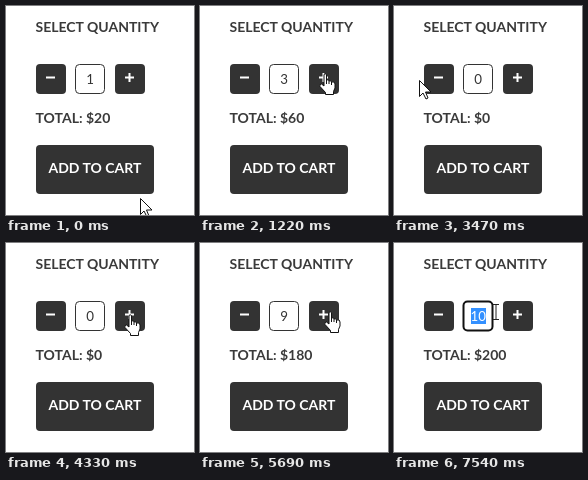
An HTML page that plays this animation: 188 by 209 pixels, repeating every 8000 ms.

```html
<!DOCTYPE html>
<html lang="en">
<head>
<meta charset="utf-8">
<title>Quantity picker</title>
<style>
  html, body { margin: 0; width: 100%; height: 100%; overflow: hidden; background: #fff; }
  svg { display: block; width: 188px; height: 209px; }
  text { font: 700 14px Lato, sans-serif; fill: #3a3a3a; }
  .dark { fill: #333; }
  .light { fill: #fff; }
  #count { font-weight: 400; font-size: 13.33px; text-anchor: middle; fill: #333; }
  #field { fill: #fff; stroke: #333; }
  #field.focus { stroke: #111; stroke-width: 2; }
  #arrow, #hand { fill: #fff; stroke: #111; stroke-linejoin: round; }
  #beam { fill: none; stroke: #222; }
</style>
</head>
<body>
<svg viewBox="0 0 188 209">
  <text x="29.5" y="26">SELECT QUANTITY</text>
  <rect class="dark" x="30" y="58" width="30" height="30" rx="4"/>
  <path class="light" d="M40 70.5h9v2h-9z"/>
  <rect id="field" x="69.5" y="58.5" width="29" height="29" rx="4"/>
  <rect id="mark" x="77" y="65" height="16" fill="#3390ff"/>
  <text id="count" x="84.2" y="78">1</text>
  <rect class="dark" x="109" y="58" width="30" height="30" rx="4"/>
  <path class="light" d="M119 70.5h9v2h-9zM122.5 67h2v9h-2z"/>
  <text id="total" x="29.5" y="117">TOTAL: $20</text>
  <rect class="dark" x="30" y="139" width="118" height="49" rx="4"/>
  <text class="light" x="42.5" y="167">ADD TO CART</text>
  <g id="cursor">
    <path id="arrow" d="M.5.5V16.5L4 13L7 19L9 18L6.5 12H12Z"/>
    <g id="hand" transform="translate(-6)">
      <path d="M5 1.5Q6 0 7.5 1.5V7Q10 6 10 8Q12 7 12.5 9Q16 8 16 11V15L14.5 18.5V21.5H6.5V19.5L1 13.5Q0 11 2.5 11L5 13Z"/>
      <path d="M7.5 7v4M10 8v3M12.5 9v3"/>
    </g>
    <path id="beam" d="M-3 -7.5h6M0 -7.5v15M-3 7.5h6"/>
  </g>
</svg>
<script>
const LOOP = 8000;
const STEP = 77;
const $ = id => document.getElementById(id);

// Pointer waypoints: time, x, y
const path = [
  [0, 134, 192], [280, 132, 142], [690, 125, 67], [1750, 126, 66],
  [2080, 50, 69], [2470, 48, 69], [3140, 51, 70], [3470, 25, 74],
  [3650, 14, 73], [3950, 31, 71], [4180, 112, 70], [4330, 124, 71],
  [4560, 129, 69], [6310, 130, 68], [6690, 104, 75], [6930, 64, 73],
  [7160, 74, 72], [7460, 104, 70], [7540, 102, 69]
];
const plus = [760, 1140, 1520];
const minus = [2310, 2470, 2700, 2920];

function pointer(t) {
  const k = path.findLastIndex(p => t >= p[0]);
  const [t0, x0, y0] = path[k];
  const [t1, x1, y1] = path[k + 1] || [LOOP, x0, y0];
  const u = Math.floor((t - t0) / STEP) * STEP / (t1 - t0);
  return [Math.round(x0 + (x1 - x0) * u), Math.round(y0 + (y1 - y0) * u)];
}

function quantity(t) {
  if (t >= 4400) return Math.min(10, Math.floor((t - 4260) / 150));
  const clicks = list => list.filter(c => t >= c).length;
  return 1 + clicks(plus) - clicks(minus);
}

function shape(x, y, t) {
  const row = y >= 58 && y < 88;
  if (t >= 7160 || row && x >= 69 && x < 99) return 'beam';
  const small = row && (x >= 30 && x < 60 || x >= 109 && x < 139);
  const cart = x >= 30 && x < 148 && y >= 139 && y < 188;
  return small || cart ? 'hand' : 'arrow';
}

function draw(t) {
  const [x, y] = pointer(t);
  const kind = shape(x, y, t);
  $('cursor').setAttribute('transform', `translate(${x} ${y})`);
  for (const id of ['arrow', 'hand', 'beam']) $(id).style.display = id === kind ? '' : 'none';

  const n = quantity(t);
  const selected = t >= 7460;
  $('count').textContent = n;
  $('count').style.fill = selected ? '#fff' : '';
  $('total').textContent = `TOTAL: $${n * 20}`;
  $('mark').setAttribute('width', selected ? 15 : 0);
  $('field').setAttribute('class', t >= 7240 ? 'focus' : '');
}

function tick() {
  draw(performance.now() % LOOP);
  requestAnimationFrame(tick);
}
tick();
</script>
</body>
</html>
```
